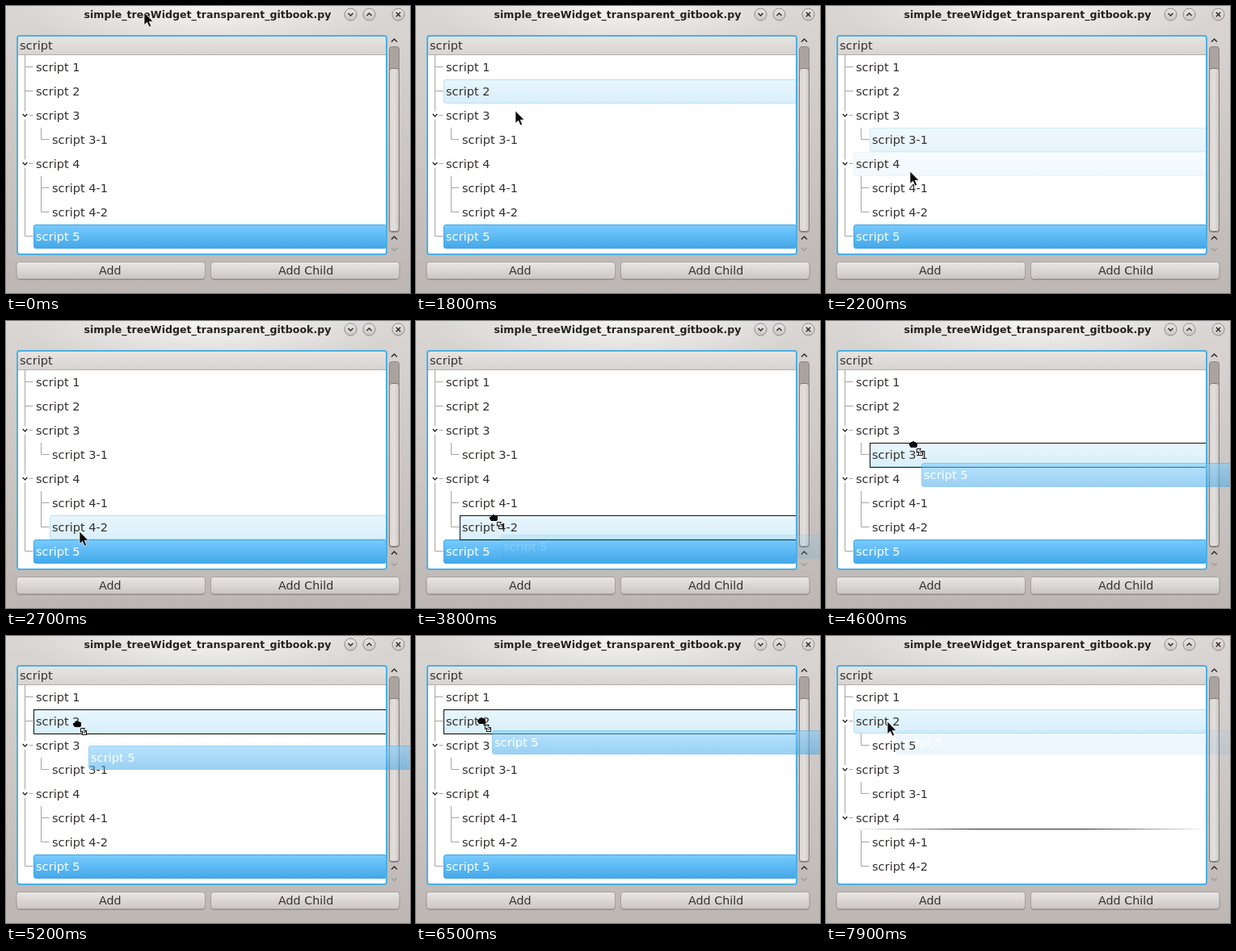
Write an HTML page that moves like this. It is 500 px wide and 356 px high and loops after 8 s.

```html
<!DOCTYPE html>
<html lang="en">
<head>
<meta charset="utf-8">
<title>Tree drag and drop</title>
<style>
  html, body { margin: 0; width: 100%; height: 100%; overflow: hidden; }
  svg { display: block; width: 100%; height: 100%; }
  text { font: 14.6px "DejaVu Sans", sans-serif; fill: #33302e; }
  .title { font-size: 12.58px; font-weight: bold; fill: #242120; }
  .button { font-size: 14.3px; }
  .light { fill: #fff; }
  .branch { fill: none; stroke: #aaa6a3; }
  .arrow { fill: none; stroke: #2b2827; stroke-width: 1.4; }
</style>
</head>
<body>
<svg viewBox="0 0 500 356">
  <defs>
    <linearGradient id="window" x2="0" y2="1">
      <stop stop-color="#d9d6d4"/><stop offset=".6" stop-color="#c9c4c1"/><stop offset="1" stop-color="#bdb7b4"/>
    </linearGradient>
    <radialGradient id="glow" gradientUnits="userSpaceOnUse" cx="0" cy="0" r="1" gradientTransform="translate(250 0) scale(230 64)">
      <stop stop-color="#fff" stop-opacity=".75"/><stop offset="1" stop-color="#fff" stop-opacity="0"/>
    </radialGradient>
    <linearGradient id="header" x2="0" y2="1">
      <stop stop-color="#e6e4e2"/><stop offset="1" stop-color="#d8d4d1"/>
    </linearGradient>
    <linearGradient id="raised" x2="0" y2="1">
      <stop stop-color="#e9e7e5"/><stop offset="1" stop-color="#cbc6c3"/>
    </linearGradient>
    <linearGradient id="thumb">
      <stop stop-color="#d8d5d2"/><stop offset=".5" stop-color="#e2dfdd"/><stop offset="1" stop-color="#cbc6c3"/>
    </linearGradient>
    <linearGradient id="selected" x2="0" y2="1">
      <stop stop-color="#78cbff"/><stop offset="1" stop-color="#43a8e8"/>
    </linearGradient>
    <linearGradient id="hovered" x2="0" y2="1">
      <stop stop-color="#e9f6fd"/><stop offset="1" stop-color="#d8effa"/>
    </linearGradient>
    <linearGradient id="fadeLine">
      <stop stop-color="#222" stop-opacity="0"/><stop offset=".35" stop-color="#222"/>
      <stop offset=".65" stop-color="#222"/><stop offset="1" stop-color="#222" stop-opacity="0"/>
    </linearGradient>
  </defs>

  <rect width="500" height="356" fill="url(#window)"/>
  <rect width="500" height="70" fill="url(#glow)"/>
  <text class="title" x="96.5" y="15">simple_treeWidget_transparent_gitbook.py</text>
  <g id="controls"></g>

  <rect x="14" y="37" width="457" height="271" rx="3" fill="#fff"/>
  <path d="M15 60V40q0-2 2-2H469q2 0 2 2V60Z" fill="url(#header)"/>
  <path d="M15 60.5H471" stroke="#b5afab"/>
  <text x="17" y="54">script</text>

  <g id="highlights"></g>
  <g id="selection">
    <rect x="34.5" y="271.5" width="436" height="29" rx="2.5" fill="url(#selected)" stroke="#45a4e0"/>
  </g>
  <g id="before"></g>
  <g id="after"><rect x="34" y="239" width="437" height="1" fill="url(#fadeLine)"/></g>
  <rect id="dropBox" height="30" fill="none" stroke="#111"/>
  <rect x="14" y="37" width="457" height="271" rx="3" fill="none" stroke="#4db0e2" stroke-width="2"/>

  <rect x="474.5" y="50.500" width="12" height="230" rx="3" fill="#aaa39f" stroke="#8b8480"/>
  <rect x="474.5" y="77.5" width="12" height="202" rx="3" fill="url(#thumb)" stroke="#7f7975"/>
  <path class="arrow" d="M477 44.5l3.5-3.5 3.5 3.5M477 289.5l3.5-3.5 3.5 3.5"/>
  <path class="arrow" d="M477 300l3.5 3.5 3.5-3.5" style="stroke:#a09a96"/>

  <g id="buttons"></g>

  <g id="ghost">
    <rect x=".5" y=".5" width="436" height="29" rx="2.5" fill="url(#selected)" stroke="#45a4e0"/>
    <text class="light" x="3" y="20">script 5</text>
  </g>
  <path id="pointer" d="M0 0V15.5L3.6 12.2 6.2 18 8.7 17 6.2 11.3H11Z" fill="#0a0a0a" stroke="#fff" stroke-width=".7"/>
  <g id="hand">
    <path d="M-5-2H-3V-4H-1V-5H1V-4H3V-3H5V1L4 3H-3L-5 0Z" fill="#080808"/>
    <rect x="6.5" y="7.5" width="5" height="5" fill="#fff" stroke="#111"/>
    <path d="M4.500 4.500H9.500L8 6.500 10.500 9 9 10.500 6.500 8 4.500 9.500Z" fill="#fff" stroke="#111"/>
  </g>
</svg>
<script>
const LOOP = 8000, STEP = 100, DRAG = 3500, DROP = 7600;
const $ = id => document.getElementById(id);

function add(parent, tag, attrs, text) {
  const node = document.createElementNS("http://www.w3.org/2000/svg", tag);
  for (const key in attrs) node.setAttribute(key, attrs[key]);
  if (text) node.textContent = text;
  return parent.appendChild(node);
}

// Each row is [label, depth, has children].
const rowsBefore = [["1", 0], ["2", 0], ["3", 0, 1], ["3-1", 1], ["4", 0, 1], ["4-1", 1], ["4-2", 1], ["5", 0]];
const rowsAfter = [["1", 0], ["2", 0, 1], ["5", 1], ["3", 0, 1], ["3-1", 1], ["4", 0, 1], ["4-1", 1], ["4-2", 1]];
const rowTop = i => 61 + 30 * i;
const rowLeft = i => 34 + 20 * rowsBefore[i][1];

function drawTree(group, rows, selected) {
  const lastRoot = rows.findLastIndex(row => row[1] === 0);
  rows.forEach(([label, depth, open], i) => {
    const x = 23.5 + 20 * depth, top = rowTop(i), mid = top + 14.5;
    const endsBranch = depth ? !rows[i + 1]?.[1] : i === lastRoot;
    const bottom = endsBranch ? mid : top + 30;
    const stem = open
      ? `M${x} ${top}V${mid - 5}` + (endsBranch ? "" : `M${x} ${mid + 5}V${bottom}`) + `M${x + 5} ${mid}H${x + 10}`
      : `M${x} ${top}V${bottom}M${x} ${mid}H${x + 10}`;
    add(group, "path", { class: "branch", d: stem });
    if (depth && i < lastRoot) add(group, "path", { class: "branch", d: `M23.5 ${top}V${top + 30}` });
    if (open) add(group, "path", { class: "arrow", d: `M${x - 2.8} ${mid - 1.5}l2.8 3 2.8-3` });
    add(group, "text", { x: 37 + 20 * depth, y: top + 20, class: i === selected ? "light" : "" }, "script " + label);
  });
}
drawTree($("before"), rowsBefore, 7);
drawTree($("after"), rowsAfter, -1);

const highlights = rowsBefore.map((_, i) => add($("highlights"), "rect", {
  x: rowLeft(i) + .5, y: rowTop(i) + .5, width: 470 - rowLeft(i), height: 29, rx: 2.5,
  fill: "url(#hovered)", stroke: "#b9e0f2"
}));

for (const [x, icon] of [[426.5, "M-3-1.5L0 1.5 3-1.5"], [449.5, "M-3 1.5L0-1.5 3 1.5"], [485.5, "M-2.7-2.7L2.7 2.7M2.7-2.7L-2.7 2.7"]]) {
  const g = add($("controls"), "g", { transform: `translate(${x} 10.5)` });
  add(g, "circle", { r: 7.5, fill: "url(#raised)", stroke: "#8e8986" });
  add(g, "path", { class: "arrow", d: icon });
}
for (const [x, labelX, label] of [[13, 115, "Add"], [253.5, 337, "Add Child"]]) {
  const shape = { x, width: 233.5, height: 21, rx: 3.5 };
  add($("buttons"), "rect", { ...shape, y: 318.5, fill: "none", stroke: "#8c8581", "stroke-opacity": .8 });
  add($("buttons"), "rect", { ...shape, y: 317.5, fill: "url(#raised)", stroke: "#a7a19d" });
  add($("buttons"), "text", { x: labelX, y: 333, class: "button" }, label);
}

// Paths are [time, x, y]; positions between keys are linear.
const cursorPath = [
  [1000, 171, 8], [1200, 165, 25], [1400, 150, 63], [1550, 136, 94], [1700, 126, 114], [1800, 123, 130],
  [1900, 118, 154], [2200, 104, 205], [2500, 93, 250], [2700, 91, 261], [2800, 90, 265], [2900, 89, 273],
  [3200, 88, 284], [3400, 88, 284], [3500, 89, 281], [3800, 96, 245], [4300, 106, 173], [4600, 108, 154],
  [5200, 88, 110], [5500, 83, 107], [5700, 82, 106], [6400, 82, 106], [6900, 76, 106]
];
const ghostPath = [
  [3500, 97, 277], [3800, 105, 265], [4300, 117, 197], [4600, 118, 176], [5200, 102, 136],
  [5500, 95, 118], [5700, 94, 117], [6500, 94, 117], [6900, 87, 117]
];
const ghostAlpha = [[3500, .04], [3800, .18], [4300, .53], [7500, .53], [7600, .43], [7900, .1]];

function sample(keys, t) {
  const next = keys.findIndex(key => key[0] > t);
  if (next === 0) return keys[0].slice(1);
  if (next < 0) return keys.at(-1).slice(1);
  const a = keys[next - 1], b = keys[next], k = (t - a[0]) / (b[0] - a[0]);
  return a.slice(1).map((v, i) => v + (b[i + 1] - v) * k);
}
const rowAt = t => Math.floor((sample(cursorPath, t)[1] - 61) / 30);
const show = (id, on) => $(id).style.display = on ? "" : "none";
const place = (id, [x, y]) => $(id).setAttribute("transform", `translate(${Math.round(x)} ${Math.round(y)})`);

function render(t) {
  const dragging = t >= DRAG && t < DROP, dropped = t >= DROP;
  const target = rowAt(t - STEP);
  // Hover trails the pointer and cross-fades; the drop target switches at once.
  const trail = dragging || dropped ? [target] : [100, 150, 200].map(lag => rowAt(t - lag));
  highlights.forEach((rect, i) => {
    rect.style.opacity = trail.filter(row => row === i).length / trail.length;
  });

  show("before", !dropped);
  show("selection", !dropped);
  show("after", dropped);

  show("dropBox", dragging && target < 7);
  if (dragging) {
    const left = rowLeft(target) + .5;
    $("dropBox").setAttribute("x", left);
    $("dropBox").setAttribute("y", rowTop(target) + .5);
    $("dropBox").setAttribute("width", 470.5 - left);
  }

  show("ghost", t >= DRAG);
  $("ghost").style.opacity = sample(ghostAlpha, t)[0];
  place("ghost", sample(ghostPath, t));

  show("pointer", !dragging);
  show("hand", dragging);
  place(dragging ? "hand" : "pointer", sample(cursorPath, t));
}

const start = performance.now();
function tick() {
  const t = (performance.now() - start) % LOOP;
  render(Math.floor(t / STEP) * STEP);
  requestAnimationFrame(tick);
}
tick();
</script>
</body>
</html>
```
